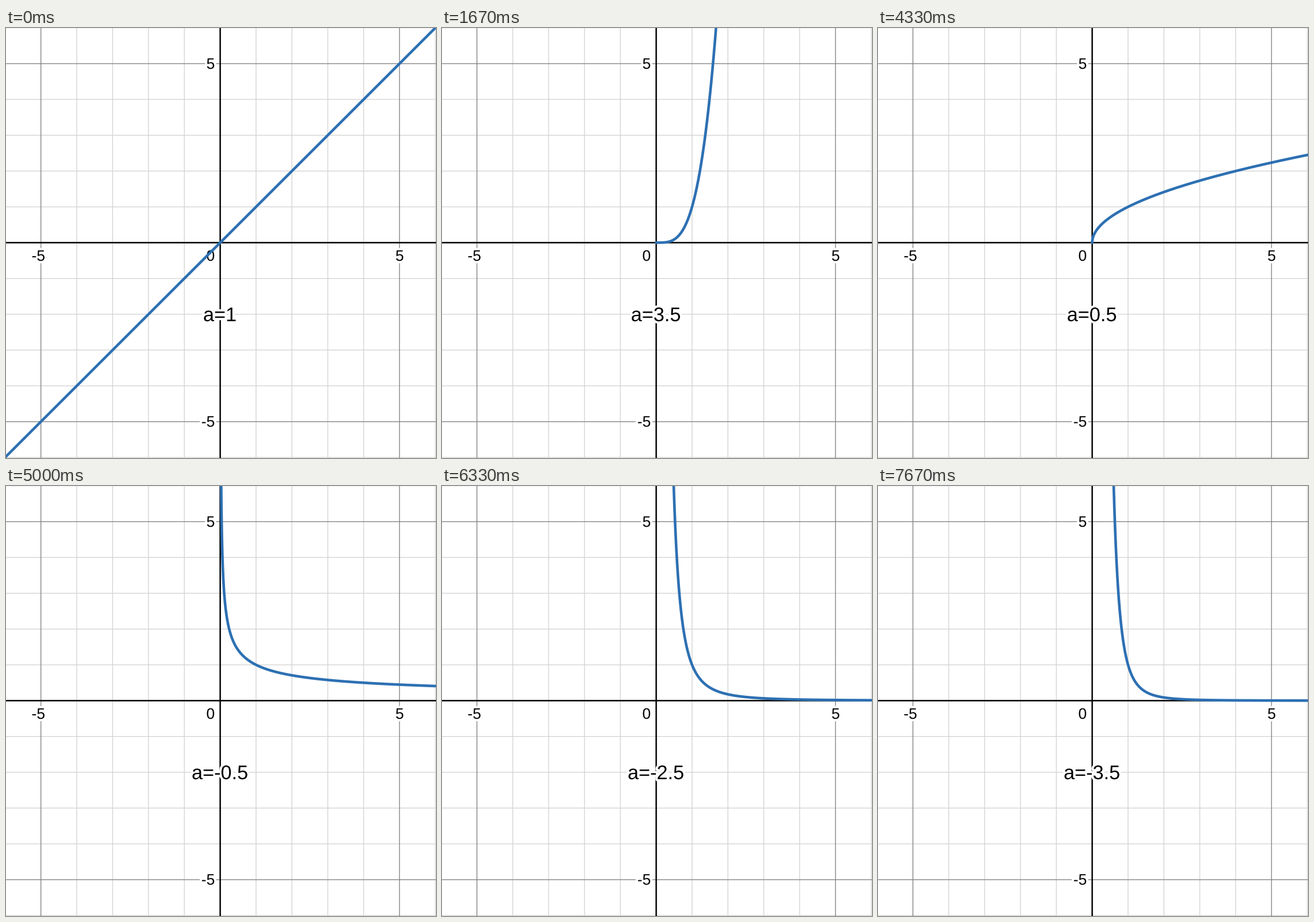
A matplotlib script that plays this animation: 748 by 748 pixels, repeating every 8000 ms.

```python
import numpy as np
import matplotlib.pyplot as plt
from matplotlib.animation import FuncAnimation
from matplotlib.patheffects import withStroke

SIZE, DPI = 748, 100
PT = 72 / DPI                       # points per pixel
CX, CY = 372.6, 373.4               # origin in pixels
UX, UY = 62.38, 62.28               # pixels per unit
INTERVAL, FRAMES = 50, 160
STEPS_PER_SECOND = 3

plt.rcParams["font.family"] = "Liberation Sans"
plt.rcParams["text.hinting"] = "none"

fig = plt.figure(figsize=(SIZE / DPI, SIZE / DPI), dpi=DPI, facecolor="white")
ax = fig.add_axes([0, 0, 1, 1])
ax.set(xlim=(0, SIZE), ylim=(SIZE, 0))
ax.axis("off")


def px(x):
    return CX + UX * x


def py(y):
    return CY - UY * y


def rule(n, color, width, zorder):
    """Draw the vertical and horizontal line at coordinate n."""
    style = dict(color=color, lw=width * PT, zorder=zorder, snap=False)
    ax.plot([px(n)] * 2, [0, SIZE], **style)
    ax.plot([0, SIZE], [py(n)] * 2, **style)


def label(x, baseline, text, size, ha="center", zorder=4):
    return ax.text(x, baseline, text, fontsize=size * PT, ha=ha, va="baseline",
                   color="black", zorder=zorder,
                   path_effects=[withStroke(linewidth=8 * PT, foreground="white")])


for n in range(-6, 7):
    if n % 5:
        rule(n, "#d2d2d2", 1.3, 1)
rule(-5, "#858585", 1.4, 2)
rule(5, "#858585", 1.4, 2)
rule(0, "black", 2.5, 3)

label(56.3, 405, "-5", 26.5)
label(684.8, 405, "5", 26.5)
label(355.8, 405, "0", 26.5)
label(363.3, 71, "5", 26.5, ha="right")
label(363.3, 693.5, "-5", 26.5, ha="right")

curve, = ax.plot([], [], color="#2d70b3", lw=4.6 * PT, zorder=5,
                 solid_capstyle="round", solid_joinstyle="round")
caption = label(372, 510, "", 34.3, zorder=6)

half = 6.3 * np.linspace(0, 1, 600) ** 2.5
both = np.concatenate([-half[:0:-1], half])


def exponent(step):
    """Bounce between 4 and -4 in halves, starting upwards from 1."""
    return 4 - abs((step - 6 + 16) % 32 - 16) / 2


def power(x, a):
    with np.errstate(all="ignore"):
        y = np.power(x, a)
    y[~(np.abs(y) < 40)] = np.nan
    return y


def update(frame):
    # the small lead keeps each step on the nearest tick
    step = (frame * INTERVAL + 40) * STEPS_PER_SECOND // 1000
    a = exponent(step)
    x = both if a == int(a) else half
    curve.set_data(px(x), py(power(x, a)))
    caption.set_text(f"a={a:g}")
    return curve, caption


anim = FuncAnimation(fig, update, frames=FRAMES, interval=INTERVAL,
                     repeat=True, repeat_delay=0)
plt.show()
```
